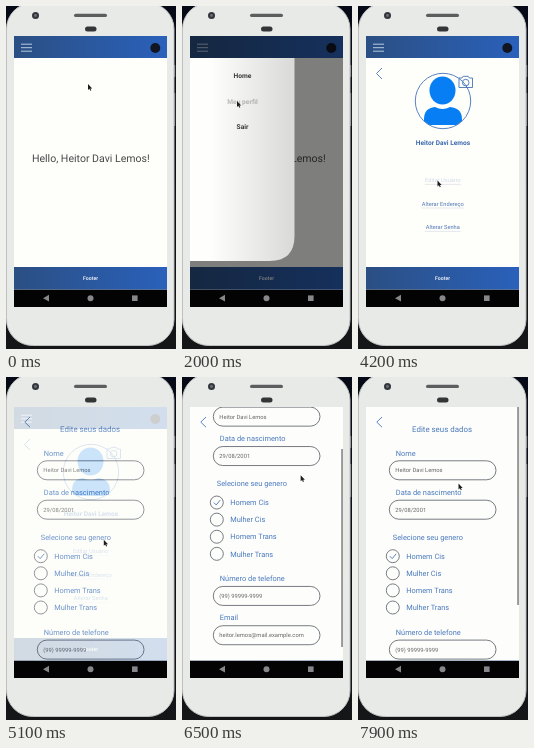
Write an HTML page that moves like this. It is 170 by 343 pixels and loops after 8 s.

```html
<!DOCTYPE html>
<html lang="pt-BR">
<head>
<meta charset="utf-8">
<title>Perfil</title>
<style>
  html, body { margin: 0; width: 100%; height: 100%; overflow: hidden; background: #080b14; }
  svg { display: block; width: 100%; height: 100%; }
  text { font-family: Roboto, Arial, sans-serif; text-rendering: geometricPrecision; }
  .mid { text-anchor: middle; }
  .line { fill: none; stroke: #4674ba; stroke-width: .9; }
  .menu { font-size: 6.7px; font-weight: 700; fill: #3a3a3a; }
  .link { font-size: 5.7px; fill: #5078b2; }
  .label { font-size: 7.4px; fill: #4a78bd; }
  .value { font-size: 5.8px; fill: #666; }
  .box { fill: none; stroke: #686c74; stroke-width: .9; }
</style>
</head>
<body>
<svg viewBox="0 0 170 343">
  <defs>
    <linearGradient id="blue"><stop stop-color="#2b4f83"/><stop offset="1" stop-color="#2a61bb"/></linearGradient>
    <linearGradient id="paper"><stop offset=".2" stop-color="#fefefc"/><stop offset="1" stop-color="#d9dad7"/></linearGradient>
    <linearGradient id="desk" x2="0" y2="1"><stop stop-color="#060a16"/><stop offset="1" stop-color="#151618"/></linearGradient>
    <clipPath id="screen"><rect x="8" y="30" width="153" height="253.5"/></clipPath>
    <clipPath id="round"><circle cx="85" cy="95" r="27.5"/></clipPath>
  </defs>

  <!-- Phone -->
  <rect width="170" height="343" fill="url(#desk)"/>
  <path d="M168.7 59v12M168.7 87v33" stroke="#8d9092"/>
  <rect x=".5" y="-3" width="167.5" height="342.5" rx="26" fill="#e8eae8" stroke="#bfc1c0"/>
  <circle cx="29.5" cy="9.5" r="3.5" fill="#33363a"/>
  <circle cx="29.5" cy="9.5" r="1.4" fill="#6b7280"/>
  <rect x="68" y="7.7" width="33" height="3.4" rx="1.7" fill="#5b5d5f"/>
  <rect x="79" y="20.5" width="11.5" height="5" rx="2.5" fill="#333537"/>
  <rect x="8" y="283" width="153" height="18" fill="#030303"/>
  <g fill="#85878a">
    <path d="M37 292.2l6-3.4v6.8z"/>
    <circle cx="84.5" cy="292.2" r="3"/>
    <rect x="126" y="289.4" width="5.6" height="5.6"/>
  </g>

  <g clip-path="url(#screen)">
    <rect x="8" y="30" width="154" height="254" fill="#fefefb"/>
    <text id="hello" class="mid" x="84.8" y="156" font-size="10.55" fill="#484848"></text>

    <g id="profile">
      <rect x="8" y="52" width="154" height="209" fill="#fefefb"/>
      <path class="line" d="M24 62l-5.5 5.5 5.5 5.5"/>
      <g id="avatar" clip-path="url(#round)" fill="#087ef5">
        <ellipse cx="84.5" cy="84.5" rx="13" ry="14"/>
        <path d="M66 119v-6q0-11 11-12q7.5 4 15 0q12 1 12 12v6z"/>
      </g>
      <circle cx="85" cy="95" r="27.7" class="line"/>
      <g class="line">
        <path d="M101 72h3l1.2-1.7h5l1.2 1.7h3.1v9.5h-13.5z"/>
        <circle cx="107.7" cy="76.6" r="3.3"/>
      </g>
      <text id="name" class="mid" x="85" y="139.2" font-size="6.6" font-weight="700" fill="#3c69ae"></text>
      <g id="links"></g>
    </g>

    <rect x="8" y="30" width="154" height="22" fill="url(#blue)"/>
    <path d="M15 38.2h11M15 41.7h11M15 45.2h11" stroke="#cbd6e8" stroke-width=".9"/>
    <circle cx="149.3" cy="42" r="5" fill="#111722"/>
    <rect x="8" y="261" width="154" height="23" fill="url(#blue)"/>
    <text class="mid" x="84.5" y="274" font-size="5.2" font-weight="500" fill="#fff">Footer</text>

    <rect id="shade" x="8" y="30" width="154" height="254"/>
    <g id="drawer">
      <path d="M8 52h104.5v178q0 25-25 25H8z" fill="url(#paper)"/>
      <text class="mid menu" x="60.5" y="71.6">Home</text>
      <text id="mine" class="mid menu" x="60.5" y="97.6">Meu perfil</text>
      <text class="mid menu" x="60.5" y="123.4">Sair</text>
    </g>

    <g id="edit">
      <rect x="8" y="30" width="154" height="254" fill="#fdfefb"/>
      <g id="form"></g>
      <path class="line" d="M24 40l-5.2 5.1 5.2 5.1"/>
      <rect id="bar" x="159.2" width="1.7" height="198" fill="#8b8d8d"/>
    </g>
  </g>

  <path id="cursor" d="M0 0v6l1.4-1.2.9 2 1-.5-.9-1.9h1.8z" fill="#1c1c1c"/>
</svg>

<script>
const $ = id => document.getElementById(id);
const USER = 'Heitor Davi Lemos';
const LOOP = 8000, STEP = 100;

const text = (cls, x, y, words) => `<text class="${cls}" x="${x}" y="${y}">${words}</text>`;

const link = (words, y, half, id) => `<g id="${id}">${text('link mid', 84.8, y, words)}</g>
  <path d="M${84.8 - half} ${y + 2.4}h${half * 2}" stroke="#d5dbe2" stroke-width=".6"/>`;

const field = (label, value, y) => text('label', 37.8, y + 2.5, label) +
  `<rect class="box" x="31.3" y="${y + 7.8}" width="106.7" height="19" rx="9.5"/>` +
  text('value', 37.3, y + 19.4, value);

const radio = (label, i) => {
  const y = 179.2 + i * 17.1;
  const check = i ? '' : `<path class="line" d="M31.8 ${y}l2.4 2.4 4-4.8"/>`;
  return `<circle class="box" cx="34.8" cy="${y}" r="6.5"/>${check}` + text('label', 48.2, y + 2.7, label);
};

$('hello').textContent = `Hello, ${USER}!`;
$('name').textContent = USER;
$('links').innerHTML = link('Editar Usuário', 176, 18, 'editLink') +
  link('Alterar Endereço', 199.6, 21.5, 'addressLink') +
  link('Alterar Senha', 223, 18, 'passwordLink');
$('form').innerHTML =
  '<text class="mid" x="84" y="54.9" font-size="7.9" fill="#4a78bd">Edite seus dados</text>' +
  field('Nome', USER, 76) +
  field('Data de nascimento', '29/08/2001', 115.4) +
  text('label', 34.8, 162.6, 'Selecione seu genero') +
  ['Homem Cis', 'Mulher Cis', 'Homem Trans', 'Mulher Trans'].map(radio).join('') +
  field('Número de telefone', '(99) 99999-9999', 255.3) +
  field('Email', 'heitor.lemos@mail.example.com', 294.6);

// Linear interpolation through [time, ...values] keys.
function track(keys, t) {
  const next = keys.findIndex(k => k[0] > t);
  if (next === 0) return keys[0].slice(1);
  if (next < 0) return keys[keys.length - 1].slice(1);
  const a = keys[next - 1], b = keys[next];
  const p = (t - a[0]) / (b[0] - a[0]);
  return a.slice(1).map((v, i) => v + (b[i + 1] - v) * p);
}

const ramp = (t, from, to) => Math.min(1, Math.max(0, (t - from) / (to - from)));
const easeOut = p => 1 - (1 - p) ** 2;
const opacity = (id, v) => $(id).setAttribute('opacity', v);
const move = (id, x, y) => $(id).setAttribute('transform', `translate(${x} ${y})`);

const pointer = [
  [100, 82, 78], [600, 23, 43], [700, 23, 43], [900, 20, 39], [1100, 20, 39],
  [1700, 55, 95], [2400, 55, 95], [3200, 101.5, 191], [3400, 96, 187], [3500, 96, 187],
  [3600, 79.5, 174.5], [4800, 79.5, 174.5], [5300, 110, 155], [5900, 113.7, 113.3],
  [6400, 118, 95], [7000, 122, 114.5], [7500, 121, 149], [7700, 121, 150], [7900, 100.5, 106.5]
];
const scrolling = [[5300, 0], [5900, 42], [6400, 56], [6700, 49], [7000, 29.7], [7500, 0]];
const picture = [[3200, .06], [3300, .4], [3400, .8], [3500, .8], [3600, 1]];

function draw(t) {
  const open = easeOut(ramp(t, 1100, 1700)) * (1 - easeOut(ramp(t, 2300, 2800)));
  opacity('shade', open * .5);
  move('drawer', (open - 1) * 106, 0);
  opacity('mine', 1 - .68 * ramp(t, 1800, 2000) * (1 - ramp(t, 2300, 2500)));

  opacity('profile', ramp(t, 2700, 3100));
  opacity('avatar', track(picture, t)[0]);
  opacity('editLink', t >= 4200 && t < 4800 ? .25 : 1);

  const [scroll] = track(scrolling, t);
  opacity('edit', ramp(t, 4700, 5200));
  move('form', 0, -scroll);
  $('bar').setAttribute('y', 30 + scroll * .783);
  opacity('bar', ramp(t, 5200, 5400));

  move('cursor', ...track(pointer, t));
}

const start = performance.now();
function tick() {
  const t = (performance.now() - start) % LOOP;
  draw(Math.floor(t / STEP) * STEP);
  requestAnimationFrame(tick);
}
tick();
</script>
</body>
</html>
```
